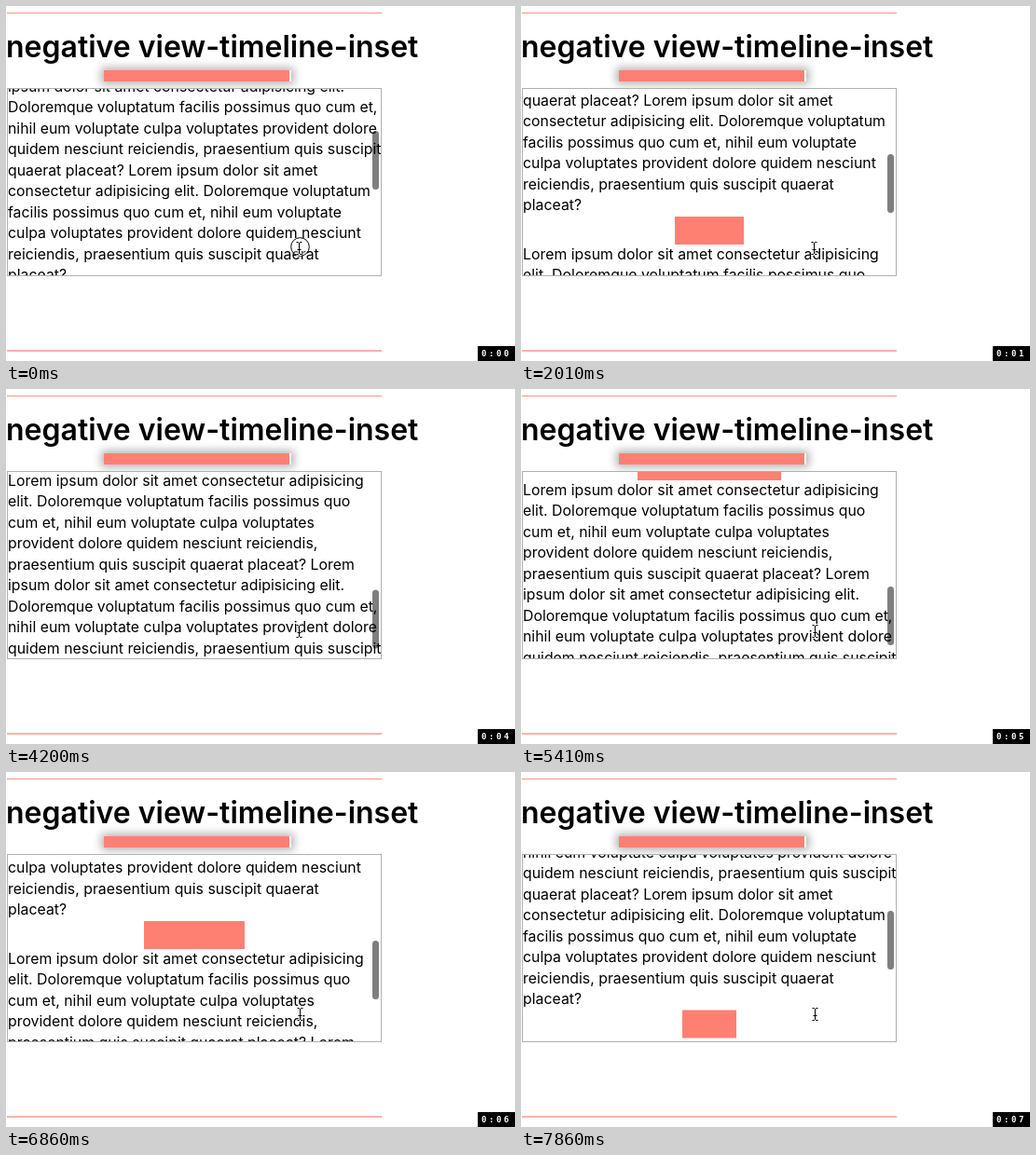
An HTML page that plays this animation: 546 by 381 pixels, repeating every 8 s.

```html
<!DOCTYPE html>
<html lang="en">
<head>
<meta charset="utf-8">
<style>
  html, body { margin: 0; width: 546px; height: 381px; overflow: hidden; background: #fff; }
  body { position: relative; font: 15.85px/22.5px Inter, sans-serif; color: #000; }
  body > *, #thumb { position: absolute; }
  h1 { left: 0; top: 25px; margin: 0; font-size: 32px; line-height: 38px; font-weight: 600; white-space: nowrap; }
  .rule { left: 1px; width: 402px; height: 1px; background: #fd8f84; }
  #bar { left: 105px; top: 69px; width: 201px; height: 12px; box-shadow: 0 0 10px 3px rgba(0, 0, 0, .3);
    background: linear-gradient(90deg, #fd8073 199px, #fff 199px); }
  #scroller { left: 1px; top: 88px; width: 400px; height: 200px; overflow: hidden; border: 1px solid #b0b0b0; background: #fff; }
  p { margin: 0; white-space: pre; }
  #subject { height: 30px; margin: 0 auto; background: #fd8073; }
  #thumb { left: 391px; top: 0; width: 7px; height: 63px; border-radius: 4px; background: rgba(0, 0, 0, .5); }
  #pointer { left: 304px; top: 248px; overflow: visible; fill: none; stroke: #000; }
  #clock { left: 506px; top: 365px; width: 36px; height: 16px; padding-left: 4px; background: #000; color: #fff;
    font: bold 9px/16px "DejaVu Sans Mono", monospace; letter-spacing: 2.6px; }
</style>
</head>
<body>
<div class="rule" style="top:7px"></div>
<h1>negative view-timeline-inset</h1>
<div id="bar"></div>
<div id="scroller">
  <div id="content"><p id="before"></p><div id="subject"></div><p id="after"></p></div>
  <div id="thumb"></div>
</div>
<div class="rule" style="top:369px;height:2px;background:#fdb0a8"></div>
<svg id="pointer" width="22" height="22">
  <circle id="ring" cx="11.5" cy="10.5" r="9.8" fill="#fff" fill-opacity=".3"/>
  <g id="beam">
    <path d="M7.5 5.5h2l1 1 1-1h2M10.5 6v12M7.5 18.5h2l1-1 1 1h2M8.5 13.5h4" stroke="#fff" stroke-width="2.5"/>
    <path d="M7.5 5.5h2l1 1 1-1h2M10.5 6v12M7.5 18.5h2l1-1 1 1h2M8.5 13.5h4"/>
  </g>
</svg>
<div id="clock"></div>
<script>
const LOOP = 8000;
const $ = id => document.getElementById(id);

const lines = `Lorem ipsum dolor sit amet consectetur adipisicing
elit. Doloremque voluptatum facilis possimus quo
cum et, nihil eum voluptate culpa voluptates
provident dolore quidem nesciunt reiciendis,
praesentium quis suscipit quaerat placeat? Lorem
ipsum dolor sit amet consectetur adipisicing elit.
Doloremque voluptatum facilis possimus quo cum et,
nihil eum voluptate culpa voluptates provident dolore
quidem nesciunt reiciendis, praesentium quis suscipit
quaerat placeat? Lorem ipsum dolor sit amet
consectetur adipisicing elit. Doloremque voluptatum
facilis possimus quo cum et, nihil eum voluptate
culpa voluptates provident dolore quidem nesciunt
reiciendis, praesentium quis suscipit quaerat
placeat?`.split('\n');
$('before').textContent = lines.join('\n');
$('after').textContent = [...lines.slice(0, 9), 'quaerat placeat?'].join('\n');

// Scroll gestures: start, end, resulting top of the subject on the stage
const startTop = 300;
const gestures = [
  [190, 720, 275], [970, 1270, 258], [1490, 1690, 250], [1880, 2180, 190], [2490, 2810, 73],
  [3380, 3820, 48], [3820, 4200, 57], [4480, 4670, 59], [4950, 5140, 60.5],
  [5270, 5590, 77], [5840, 6140, 117], [6330, 6560, 158], [6830, 7090, 192],
  [7250, 7480, 225], [7670, 7860, 255]
];
const ticks = [1000, 2030, 2990, 4000, 5000, 6000, 7000];

function subjectTop(t) {
  let top = startTop;
  for (const [start, end, target] of gestures) {
    const k = Math.min(1, Math.max(0, (t - start) / (end - start)));
    top += (target - top) * k * k * (3 - 2 * k);
  }
  return Math.round(top * 2) / 2;
}

function draw(t) {
  const top = subjectTop(t);
  $('content').style.transform = `translateY(${top - 426.5}px)`;
  // Progress runs between the two rules, 392px of travel
  $('subject').style.width = 200 * (370 - top) / 392 + 'px';
  $('thumb').style.transform = `translateY(${45 + (startTop - top) * 0.335}px)`;
  $('ring').style.display = t < 30 ? '' : 'none';
  $('beam').setAttribute('transform', `translate(${t < 4950 ? 0 : 1} 0)`);
  $('clock').textContent = '0:0' + ticks.filter(tick => t >= tick).length;
}

const origin = performance.now();
function frame() {
  draw((performance.now() - origin) % LOOP);
  requestAnimationFrame(frame);
}
frame();
</script>
</body>
</html>
```
